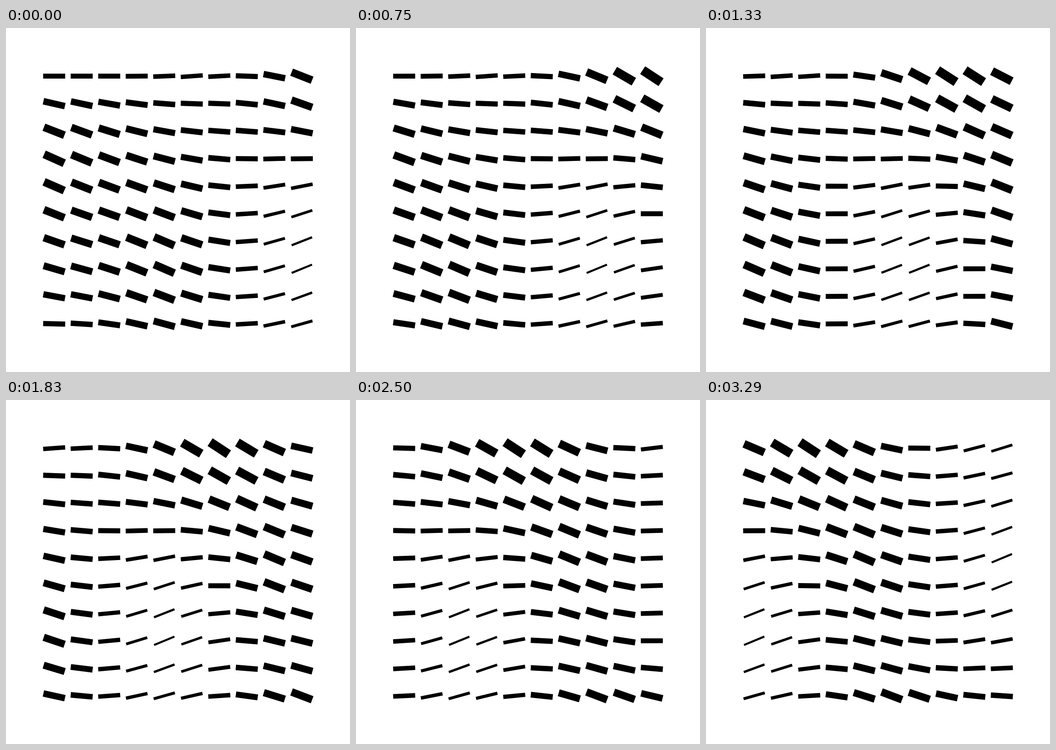
Write an HTML page with a canvas that moves like this. It is 748 px wide and 748 px high and loops after 3330 ms.

```html
<!DOCTYPE html>
<html lang="en">
<head>
<meta charset="utf-8">
<title>Noise grid</title>
<style>
  html, body { margin: 0; width: 100%; height: 100%; overflow: hidden; background: #fff; }
  canvas { display: block; width: 748px; height: 748px; }
</style>
</head>
<body>
<canvas id="stage" width="748" height="748"></canvas>
<script>
const ctx = document.getElementById('stage').getContext('2d');
const STAGE = 748, UNITS = 1080, N = 10;
const LOOP = 3330, STEP = 1000 / 24, LAST = 79;
const CELL = UNITS * 0.8 / N, MARGIN = UNITS * 0.1, BAR = CELL * 0.8;

// Simplex lattice: skewed cell i, j and its gradient gx, gy
const SKEW = (3 - Math.sqrt(3)) / 6;
const lattice = [
  [0, 0, 0, 1], [1, 0, 1, 1], [2, 0, 0, -1],
  [0, 1, 0, -1], [1, 1, -1, 0], [2, 1, -1, 0], [3, 1, 0, 1],
  [1, 2, 0, 1], [2, 2, 1, -1], [3, 2, 0, -1]
].map(([i, j, gx, gy]) => ({ x: i - (i + j) * SKEW, y: j - (i + j) * SKEW, gx, gy }));

function noise(x, y) {
  let sum = 0;
  for (const p of lattice) {
    const dx = x - p.x, dy = y - p.y;
    const t = 0.5 - dx * dx - dy * dy;
    if (t > 0) sum += t ** 4 * (p.gx * dx + p.gy * dy);
  }
  return 70 * sum;
}

function drawBar(x, y, n) {
  ctx.save();
  ctx.translate(MARGIN + x + CELL / 2, MARGIN + y + CELL / 2);
  ctx.rotate(n * Math.PI * 0.2);
  ctx.lineWidth = 1 + 14.5 * (n + 1);
  ctx.beginPath();
  ctx.moveTo(-BAR / 2, 0);
  ctx.lineTo(BAR / 2, 0);
  ctx.stroke();
  ctx.restore();
}

function draw(step) {
  const k = STAGE / UNITS;
  ctx.setTransform(k, 0, 0, k, 0, 0);
  ctx.fillStyle = '#fff';
  ctx.fillRect(0, 0, UNITS, UNITS);
  ctx.strokeStyle = '#000';
  for (let row = 0; row < N; row++) {
    for (let col = 0; col < N; col++) {
      const x = col * CELL, y = row * CELL;
      drawBar(x, y, noise((x + step * 10) / 1000, y / 1000));
    }
  }
}

// 24 steps a second, switching on whole hundredths
function stepAt(ms) {
  const t = Math.floor((ms % LOOP) / 10) * 10;
  return Math.min(LAST, Math.floor((t + 4.99) / STEP));
}

let shown = -1;
function tick(now) {
  const step = stepAt(now);
  if (step !== shown) draw(shown = step);
  requestAnimationFrame(tick);
}
draw(0);
requestAnimationFrame(tick);
</script>
</body>
</html>
```
